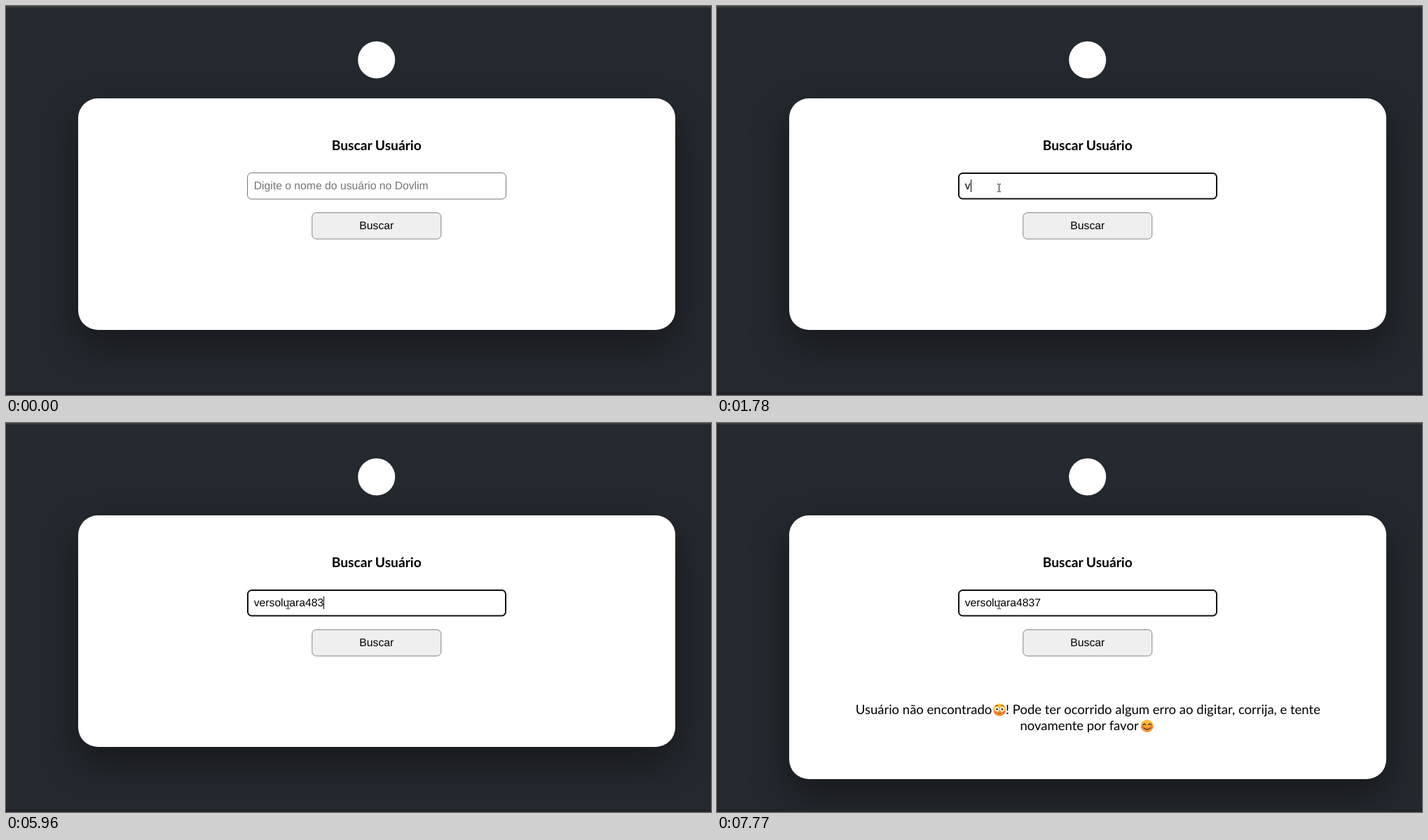
An HTML page for the animation above (8 s loop, 1006x556 px).

```html
<!DOCTYPE html>
<html lang="pt-BR">
<head>
<meta charset="utf-8">
<title>Buscar Usuário</title>
<style>
  html, body { margin: 0; width: 100%; height: 100%; overflow: hidden; background: #24292f; }
  #stage { position: relative; width: 1006px; height: 556px; overflow: hidden; }
  #stage::before, #stage::after { content: ""; position: absolute; left: 0; right: 0; }
  #stage::before { top: 0; height: 2px; background: #393d3c; }
  #stage::after { bottom: 0; height: 4px; background: #22232b; }
  #card {
    position: absolute; left: 103px; top: 132px; width: 852px; height: 330.5px;
    border-radius: 28px; background: #fff; box-shadow: 0 23px 56px rgba(0, 0, 0, .4);
  }
  svg { position: absolute; left: 0; top: 0; }
  text { text-rendering: geometricPrecision; }
  .control { font: 15.72px "Liberation Sans", Arial, sans-serif; }
  .title { font: 700 19.2px Lato, sans-serif; }
  .message { font: 18.5px Lato, sans-serif; }
  .middle { text-anchor: middle; }
</style>
</head>
<body>
<div id="stage">
  <div id="card"></div>
  <svg width="1006" height="556" viewBox="0 0 1006 556">
    <defs>
      <linearGradient id="skin" x2="0" y2="1">
        <stop offset="0" stop-color="#ffc83d"/>
        <stop offset="1" stop-color="#f58a2c"/>
      </linearGradient>
    </defs>
    <circle cx="528.7" cy="77" r="26.5" fill="#fff"/>
    <text class="title middle" x="528.7" y="206">Buscar Usuário</text>

    <rect id="field" fill="#fff"/>
    <text id="placeholder" class="control" x="353.7" y="262" fill="#757575">Digite o nome do usuário no Dovlim</text>
    <text id="typed" class="control" x="353.7" y="262"></text>
    <rect id="caret" y="248" width="1" height="18"/>

    <rect id="button"/>
    <text id="label" class="control middle" x="528.8" y="319">Buscar</text>

    <g id="message" class="message">
      <text class="middle" x="295" y="416.3">Usuário não encontrado</text>
      <text class="middle" x="636.5" y="416.3">! Pode ter ocorrido algum erro ao digitar, corrija, e tente</text>
      <text class="middle" x="517" y="439.3">novamente por favor</text>
      <g transform="translate(403.2 410)">
        <circle r="9" fill="url(#skin)"/>
        <g fill="#f0553f" opacity=".65"><circle cx="-5.8" cy="3.6" r="2.2"/><circle cx="5.8" cy="3.6" r="2.2"/></g>
        <g fill="#fff"><circle cx="-3.8" cy="-.8" r="3.1"/><circle cx="3.8" cy="-.8" r="3.1"/></g>
        <g fill="#402a32"><circle cx="-3.6" cy="-.8" r="1.4"/><circle cx="3.6" cy="-.8" r="1.4"/></g>
        <path d="M-6.2-5.2Q-4.5-6.8-2.6-6.6M6.2-5.2Q4.5-6.8 2.6-6.6M-2 5.2H2" fill="none" stroke="#6b3b2c" stroke-linecap="round"/>
      </g>
      <g transform="translate(613.7 433)">
        <circle r="9" fill="url(#skin)"/>
        <g fill="#f0553f" opacity=".65"><circle cx="-6" cy="2" r="2.2"/><circle cx="6" cy="2" r="2.2"/></g>
        <path d="M-6-1.5Q-4-4.5-2-1.5M6-1.5Q4-4.5 2-1.5M-4 3.2Q0 7 4 3.2" fill="none" stroke="#402a32" stroke-width="1.3" stroke-linecap="round"/>
      </g>
    </g>

    <g id="arrow" class="cursor">
      <path d="M.5.5V13L3.4 10.3 5.3 14.5 7.3 13.6 5.4 9.5H9.3Z" fill="#fff" stroke="#111" stroke-width=".9"/>
    </g>
    <g id="hand" class="cursor">
      <path d="M-1.8 11V1.2Q-1.8-.1-.6-.1T.7 1.2V6.2Q2-.1 3.1 6.5 4.6 5 5.4 7 7.8 6.2 7.8 8.5V12Q7.8 14.5 6.2 16V18H-1V16L-5.3 10.7Q-5.8 9-4.2 9Z" fill="#fff" stroke="#111" stroke-linejoin="round"/>
      <path d="M.8 6V9.5M3.2 6.5V9.5M5.5 7.2V9.7" stroke="#111" stroke-width=".8"/>
    </g>
    <g id="beam" class="cursor">
      <path d="M-2.5-5.5H-.8L0-5 .8-5.5H2.5M0-5V5M-2.5 5.5H-.8L0 5 .8 5.5H2.5" fill="none" stroke="#222"/>
    </g>
  </svg>
</div>
<script>
  const DURATION = 8000, FOCUS = 1250, REPLY = 7420, BLINK = 530;
  const USER = "versoluara4837";
  const keyTimes = [1780, 1840, 2040, 2500, 2570, 3030, 3300, 3430, 4240, 4370, 5560, 5760, 5960, 6160];
  // time, shape, x, y
  const pointer = [
    [250, "arrow", 631, 435],
    [310, "arrow", 587, 394],
    [570, "arrow", 514, 345],
    [640, "hand", 441, 297],
    [700, "arrow", 421, 283],
    [770, "beam", 410, 271],
    [830, "beam", 406, 266],
    [900, "beam", 404, 263],
    [970, "beam", 403, 261],
    [1050, "beam", 402.5, 260]
  ];

  const $ = id => document.getElementById(id);
  const set = (id, attrs) => {
    for (const [name, value] of Object.entries(attrs)) $(id).setAttribute(name, value);
  };
  const show = (id, visible) => { $(id).style.display = visible ? "" : "none"; };

  // A rounded box whose stroke lies inside its outer edge.
  const box = (id, x, y, w, h, line, attrs) => set(id, {
    x: x + line / 2, y: y + line / 2, width: w - line, height: h - line,
    rx: 6.5 - line / 2, "stroke-width": line, ...attrs
  });

  function drawPointer(t) {
    const step = pointer.filter(p => p[0] <= t).pop();
    for (const shape of ["arrow", "hand", "beam"]) show(shape, step && step[1] === shape);
    if (step) set(step[1], { transform: `translate(${step[2]} ${step[3]})` });
    return step && step[1] === "hand";
  }

  function drawField(t) {
    const focused = t >= FOCUS;
    const count = keyTimes.filter(k => k <= t).length;
    box("field", 344, 238, 370, 38.5, focused ? 2 : 1, { stroke: focused ? "#101010" : "#767676" });
    show("placeholder", !count);
    $("typed").textContent = USER.slice(0, count);

    const since = t - (count ? keyTimes[count - 1] : FOCUS);
    show("caret", focused && Math.floor(since / BLINK) % 2 === 0);
    const width = count ? $("typed").getComputedTextLength() : 0;
    set("caret", { x: Math.round(353.7 + width) });
  }

  function drawButton(hover) {
    if (hover) box("button", 437, 295.7, 183.5, 37, 0, { fill: "#ff69b4", stroke: "none" });
    else box("button", 436.3, 295, 185, 38.5, 1, { fill: "#efefef", stroke: "#858585" });
    set("label", { fill: hover ? "#fff" : "#000" });
  }

  function render(t) {
    drawButton(drawPointer(t));
    drawField(t);
    show("message", t >= REPLY);
    $("card").style.height = t >= REPLY ? "376.5px" : "330.5px";
  }

  const start = performance.now();
  function tick() {
    render((performance.now() - start) % DURATION);
    requestAnimationFrame(tick);
  }
  tick();
</script>
</body>
</html>
```
